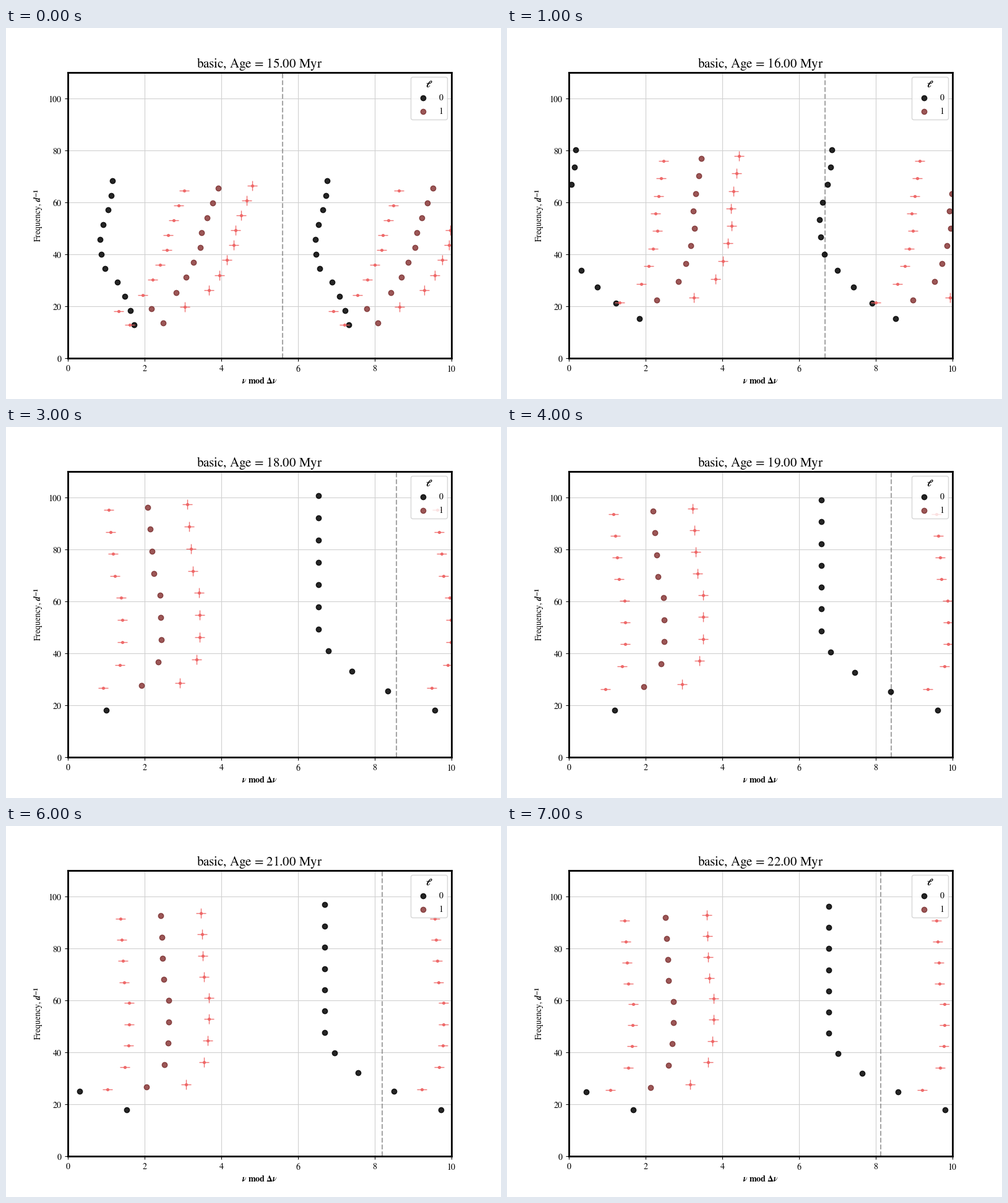
Animation, 800 px wide and 600 px high, one loop 8000 ms. Source, as a matplotlib script:

```python
import numpy as np
import matplotlib.pyplot as plt
from matplotlib.animation import FuncAnimation

plt.rcParams.update({
    "font.family": "Liberation Serif",
    "mathtext.fontset": "stix",
    "font.size": 10,
    "axes.linewidth": 2,
})

PX = 62  # pixels per unit of the x axis
AGES = range(15, 23)

# Key points over age; other ages are interpolated.
KEYS = [15, 16, 17, 18, 20, 22]
SEPARATION = [5.600, 6.677, 8.048, 8.560, 8.258, 8.124]
RADIAL = [73, 12, -97, -125.5, -101.5, -84]   # px
DIPOLE = [206, 195, 150, 141, 150, 161]       # px
SPLITTING = [54.4, 60.4, 62.5, 62.7, 63.5, 65.3]  # px


def radial_offset(n, sep):
    """Steep rise towards low n when evolved, a shallow dip when young."""
    young = np.clip((8.05 - sep) / 2.45, 0, 1)
    k = np.clip(6 - n, 0, None)
    rise = (1 - young) * 15.5 * k ** 1.8 + young * 13 * k ** 0.7
    dip = 21 * min(1, 2 * young) * np.exp(-((n - 7.7) / 2.4) ** 2)
    return rise - dip


def dipole_offset(n, sep):
    """A tilted ridge with a knee at n = 3 and a step after n = 7."""
    knee = 8 - 37 * np.exp(-1.5 * abs(n - 3))
    tilt = 4.1 * (8.14 - sep)
    return tilt * (n - 7) + np.where(n < 8, knee, -1.6 * (n - 8))


def modes(age):
    """Separation and the frequencies of the four ridges."""
    sep, radial, dipole, split = (
        np.interp(age, KEYS, v)
        for v in (SEPARATION, RADIAL, DIPOLE, SPLITTING))
    n0 = np.arange(2, 13)
    n1 = np.arange(2 if age == 15 else 3, 12)
    nu0 = n0 * sep + (radial + radial_offset(n0, sep)) / PX
    nu1 = n1 * sep + (dipole + dipole_offset(n1, sep)) / PX
    shift = split * (1 + 0.003 * (n1 - 7)) / PX
    return sep, nu0, nu1, nu1 - shift, (nu1 + shift)[n1 > 2]


def echelle(nu, sep):
    x = nu % sep
    return np.concatenate([x, x + sep]), np.concatenate([nu, nu])


def roman(s):
    return rf"$\text{{{s}}}$"


fig, ax = plt.subplots(figsize=(8, 6), dpi=100)
ax.set(xlim=(0, 10), ylim=(0, 110))
ax.set_axisbelow(True)
ax.grid(color="#d0d0d0", lw=0.8)
for axis in (ax.xaxis, ax.yaxis):
    axis.set_major_formatter(lambda v, _: roman(f"{v:.0f}"))
ax.set_xlabel(r"$\mathbfit{\nu}\ \mathbf{mod}\ \mathbf{\Delta}\mathbfit{\nu}$")
ax.set_ylabel(r"$\text{Frequency, }\mathbfit{d}^{\mathbf{-1}}$")
title = ax.set_title("", fontsize=15)
divider = ax.axvline(0, color="gray", ls="--", lw=1.5, alpha=0.7, zorder=1.5)


def ridge(marker, size, color, zorder, **style):
    return ax.plot([], [], ls="", marker=marker, ms=size, color=color,
                   zorder=zorder, **style)[0]


RED = "#ee6464"
big = dict(alpha=0.85, mew=1)
radial = ridge("o", 6, "black", 2, label=roman(0), **big)
dipole = ridge("o", 6, "#8b3a3a", 2.1, label=roman(1), mec="#7a2e2e", **big)
bars_low = ridge("_", 11, RED, 2.2, mew=1, alpha=0.9)
dots_low = ridge("o", 3, RED, 2.3, mew=0.6, alpha=0.9)
bars_high = ridge("+", 11, RED, 2.2, mew=1, alpha=0.9)
dots_high = ridge("o", 3, RED, 2.3, mew=0.6, alpha=0.9)
ax.legend(title=r"$\mathbf{\ell}$", title_fontsize=11, loc="upper right")


def draw(i):
    age = AGES[i]
    sep, nu0, nu1, low, high = modes(age)
    for line, nu in ((radial, nu0), (dipole, nu1),
                     (bars_low, low), (dots_low, low),
                     (bars_high, high), (dots_high, high)):
        line.set_data(*echelle(nu, sep))
    divider.set_xdata([sep, sep])
    title.set_text(roman(f"basic, Age = {age:.2f} Myr"))
    return radial, dipole, divider, title


anim = FuncAnimation(fig, draw, frames=len(AGES), interval=1000, repeat=True,
                     repeat_delay=0, init_func=lambda: draw(0))
plt.show()
```
